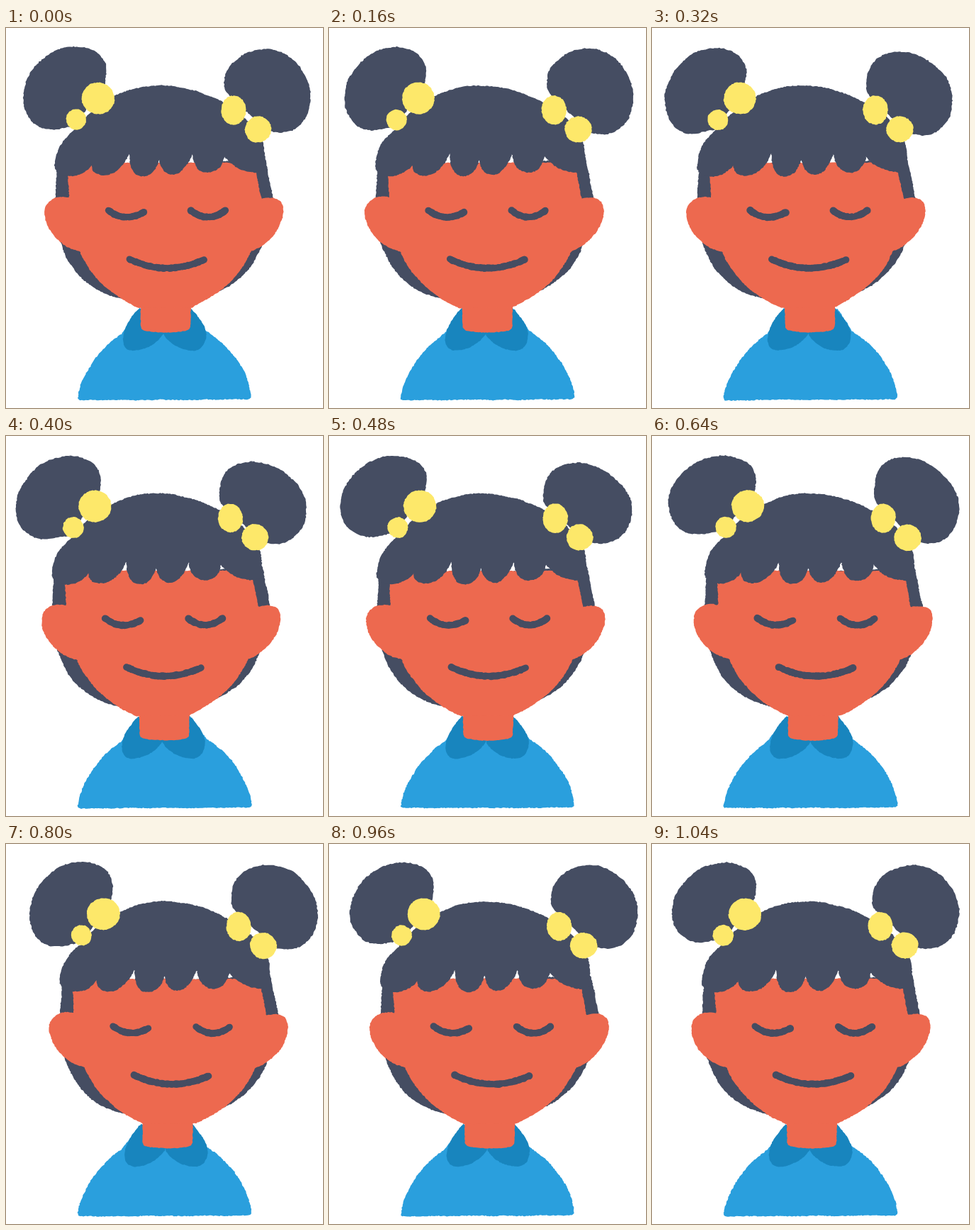
An HTML page with a canvas that plays this animation: 447 px wide and 536 px high, repeating every 1120 ms.

```html
<!DOCTYPE html>
<html lang="en">
<head>
<meta charset="utf-8">
<title>Girl swaying</title>
<style>
  html, body { margin: 0; width: 100%; height: 100%; overflow: hidden; background: #fff; }
  canvas { display: block; }
</style>
</head>
<body>
<canvas id="stage" width="447" height="536"></canvas>
<script>
const STEP = 80, STEPS = 14;
const HAIR = '#454d62', SKIN = '#ed694f', SHIRT = '#2a9fdd', COLLAR = '#1885be', BEAD = '#fde86a';
const ctx = document.getElementById('stage').getContext('2d');

// Sideways sway of the head at each step
const sway = [0, -2, -3.6, -5, -5.4, -4, -1.7, 1.6, 4.6, 6.2, 6.6, 5.6, 3.2, 1.1];

// step, left bun (left, right, top, bottom), right bun (left, right, top, bottom, crown)
const buns = [
  [0,  24, 142, 26, 143, 308, 429, 30, 148, .49],
  [2,  22, 137, 27, 144, 307, 429, 29, 150, .5],
  [4,  18, 133, 28, 149, 302, 424, 33, 152, .4],
  [5,  14, 134, 28, 146, 301, 424, 36, 152, .38],
  [6,  16, 138, 28, 142, 302, 427, 38, 152, .38],
  [8,  23, 147, 28, 139, 313, 433, 30, 152, .36],
  [10, 33, 151, 25, 145, 317, 440, 29, 149, .43],
  [13, 28, 147, 26, 139, 311, 433, 30, 148, .48],
  [14, 24, 142, 26, 143, 308, 429, 30, 148, .49]
];

function bunsAt(step) {
  const i = buns.findIndex(row => row[0] > step);
  const a = buns[i - 1], b = buns[i];
  const p = (step - a[0]) / (b[0] - a[0]);
  return a.map((v, j) => v + (b[j] - v) * p);
}

// Points along a path, about two pixels apart
function trace(d) {
  const path = document.createElementNS('http://www.w3.org/2000/svg', 'path');
  path.setAttribute('d', d);
  const len = path.getTotalLength(), n = Math.round(len / 2);
  return Array.from({ length: n + 1 }, (_, i) => {
    const p = path.getPointAtLength(len * i / n);
    return [p.x, p.y];
  });
}

const bead = (x, y, rx, ry) =>
  trace(`M${x - rx} ${y}a${rx} ${ry} 0 1 1 ${2 * rx} 0a${rx} ${ry} 0 1 1 ${-2 * rx} 0Z`);

const leftBun = trace('M63 0C84 0 100 13 100 30L98 46L62 96C55 95 45 100 33 100C13 100 0 83 0 62C0 30 30 0 63 0Z');

function rightBun(crown) {
  const c = crown * 100;
  return trace(`M${c} 0C${c + 28} 0 100 28 100 57C100 80 87 100 64 100L50 98L10 60C0 50 0 48 0 40C0 18 ${c - 28} 0 ${c} 0Z`);
}

const fit = (points, l, r, t, b) =>
  points.map(([x, y]) => [l + (r - l) * x / 100, t + (b - t) * y / 100]);

const backHair = trace('M72 200L69 245C69 330 110 372 165 382L290 375C330 362 358 330 366 290L377 242L366 185Z');
const cap = trace(`M69 195C70 172 80 156 98 142C130 100 175 81 215 81C255 81 290 95 318 112
  C345 130 360 150 364 168L367 200L353 204C335 203 318 196 308 181C305 195 298 204 285 204
  C270 204 264 192 262 178C256 195 246 207 235 207C224 207 218 198 216 186
  C212 200 205 209 193 209C180 209 174 197 174 177C165 198 152 208 138 208
  C127 208 120 202 121 193C114 203 102 209 90 209C78 208 69 204 69 195Z`);
const face = trace(`M86 190L89 239C72 234 54 243 54 260C54 280 72 309 104 315
  C116 344 142 376 188 395L262 394C300 376 330 352 345 315C368 308 391 282 391 258
  C391 240 378 237 360 241L353 205L350 190Z`);
const neck = trace('M190 385L190 421Q191 426 197 427Q228 432 254 427Q260 425 260 420L261 385Z');
const shirt = trace(`M101 521C106 490 130 452 163 431L188 397L262 397L283 428
  C315 447 342 484 346 519Q346 524 341 524L105 525Q101 525 101 521Z`);
const collar = [
  trace('M188 395C176 408 168 420 165 434C163 448 170 456 181 455C198 454 212 446 222 432L222 410Z'),
  trace('M260 395C270 406 279 416 282 430C283 446 274 456 262 455C246 454 230 446 222 432L222 410Z')
];
const beads = [
  bead(130, 99, 23, 22.5), bead(99, 129, 14.5, 14.5),
  bead(321, 116, 17.5, 20.5), bead(355.5, 143, 19, 18.5)
];
const strokes = [
  trace('M144 257Q167 275 194 260'),
  trace('M261 257.5Q285 276 309 257.5'),
  trace('M174 326Q226 351 279 327')
];

let seed = 1;
function rand() {
  seed = (seed * 16807) % 2147483647;
  return seed / 2147483647 * 2 - 1;
}

// Fill a shape whose edge trembles like a dry brush
function fill(points, color, rough = .6) {
  const slow = Array.from({ length: Math.ceil(points.length / 8) }, () => [rand(), rand()]);
  ctx.beginPath();
  points.forEach(([x, y], i) => {
    const k = Math.floor(i / 8), p = i % 8 / 8;
    const a = slow[k], b = slow[(k + 1) % slow.length];
    const drift = j => a[j] + (b[j] - a[j]) * p;
    ctx.lineTo(x + (rand() + drift(0)) * rough, y + (rand() + drift(1)) * rough);
  });
  ctx.fillStyle = color;
  ctx.fill();
}

function brush(points) {
  ctx.fillStyle = HAIR;
  for (const [x, y] of points) {
    ctx.beginPath();
    ctx.arc(x + rand() * .3, y + rand() * .3, 4.8 + rand() * .5, 0, 7);
    ctx.fill();
  }
}

function shifted(dx, angle, paint) {
  ctx.save();
  ctx.translate(222 + dx, 300);
  ctx.rotate(angle);
  ctx.translate(-222, -300);
  paint();
  ctx.restore();
}

function draw(step) {
  seed = 7919 * (step + 3);
  const d = sway[step], tilt = d * .0006;
  const [, l, r, t, b, l2, r2, t2, b2, crown] = bunsAt(step);

  ctx.fillStyle = '#fff';
  ctx.fillRect(0, 0, 447, 536);
  fill(fit(leftBun, l, r, t, b), HAIR, .7);
  fill(fit(rightBun(crown), l2, r2, t2, b2), HAIR, .7);
  shifted(d, tilt, () => fill(backHair, HAIR));
  fill(shirt, SHIRT);
  shifted(d * .35, 0, () => collar.forEach(c => fill(c, COLLAR, .4)));
  shifted(d * .45, 0, () => fill(neck, SKIN, .4));
  shifted(d, tilt, () => {
    fill(face, SKIN, .5);
    fill(cap, HAIR);
    strokes.forEach(brush);
    beads.forEach(c => fill(c, BEAD, .5));
  });
}

let shown = -1;
const start = performance.now();
function tick() {
  const step = Math.floor((performance.now() - start) / STEP) % STEPS;
  if (step !== shown) draw(shown = step);
  requestAnimationFrame(tick);
}
tick();
</script>
</body>
</html>
```
